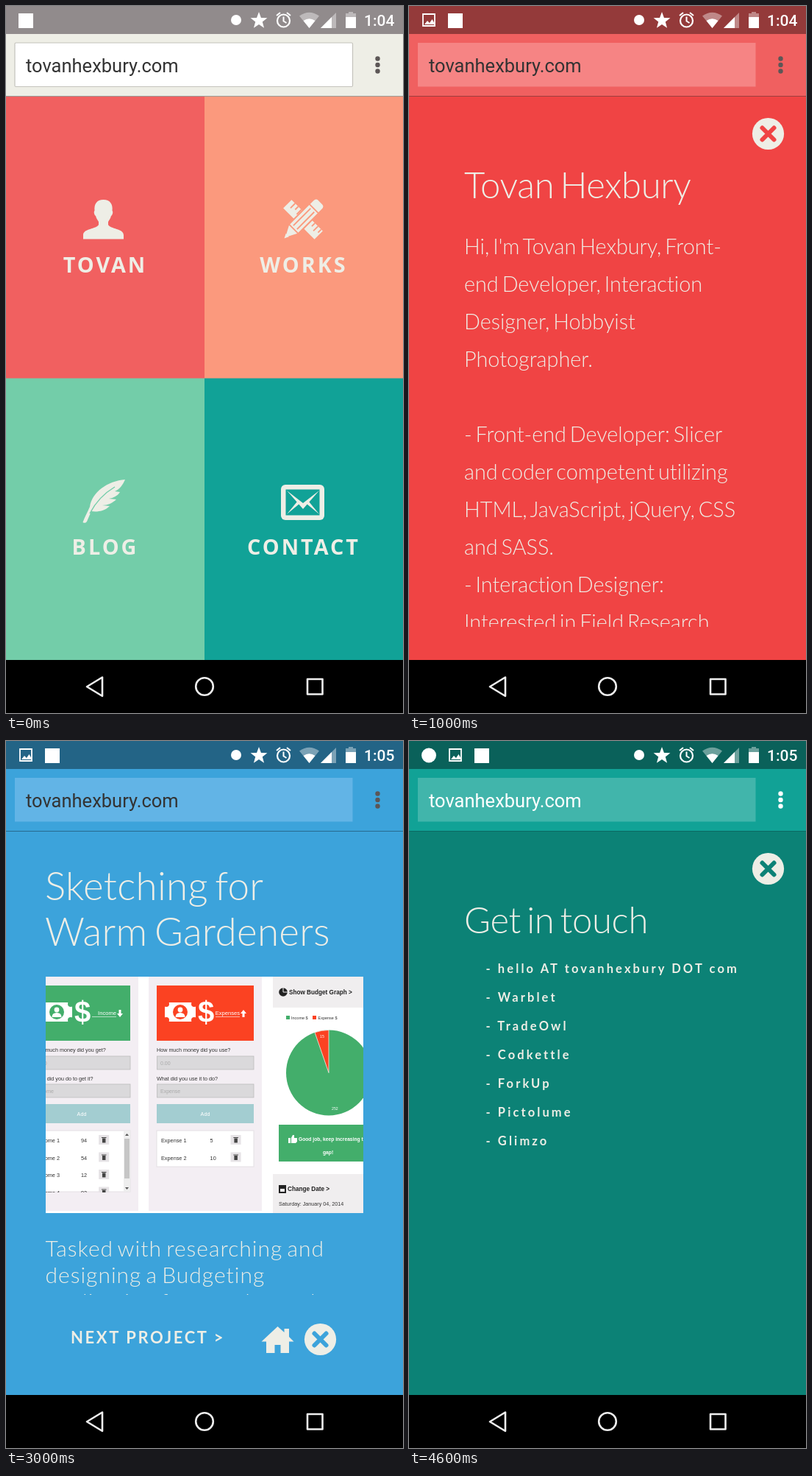
Recreate the animation shown at these times as an HTML page. Size 540 px wide and 960 px high, loop 5 s.

```html
<!DOCTYPE html>
<html lang="en">
<head>
<meta charset="utf-8">
<title>Mobile site tour</title>
<style>
  html, body { margin: 0; width: 100%; height: 100%; overflow: hidden; background: #000; }
  svg { display: block; width: 100vw; height: 100vh; }
  text { white-space: pre; }
  .roboto { font-family: Roboto, sans-serif; }
  .lato { font-family: Lato, sans-serif; fill: #eeeee6; font-variant-ligatures: none; }
  .light { font-weight: 300; word-spacing: -0.1em; }
  .bold { font-weight: 700; }
  .label { font: 700 28.8px "Open Sans", sans-serif; letter-spacing: 3px; fill: #eeeee6; text-anchor: middle; }
  .arial { font-family: "Liberation Sans", Arial, sans-serif; }
</style>
</head>
<body>
<svg id="stage" viewBox="0 0 540 960" xmlns="http://www.w3.org/2000/svg"></svg>
<script>
const CREAM = '#eeeee6', GREEN = '#43ae6b', RED = '#fb4222';
const SITE = 'tovanhexbury.com';
const SCENE_MS = 1000;

const rect = (x, y, w, h, fill, extra = '') =>
  `<rect x="${x}" y="${y}" width="${w}" height="${h}" fill="${fill}" ${extra}/>`;
const circle = (x, y, r, fill, extra = '') =>
  `<circle cx="${x}" cy="${y}" r="${r}" fill="${fill}" ${extra}/>`;
const path = (d, fill, extra = '') => `<path d="${d}" fill="${fill}" ${extra}/>`;
const line = (d, color, width, extra = '') =>
  path(d, 'none', `stroke="${color}" stroke-width="${width}" ${extra}`);
const group = (content, attrs) => `<g ${attrs}>${content}</g>`;
const text = (x, y, str, size, cls, extra = '') =>
  `<text x="${x}" y="${y}" font-size="${size}" class="${cls}" ${extra}>${str.replace(/>/g, '&gt;')}</text>`;
const lato = (x, y, str, size, spacing = 0, weight = 'bold', extra = '') =>
  text(x, y, str, size, 'lato ' + weight, `letter-spacing="${spacing}" ${extra}`);
const arial = (x, y, str, size, fill = '#333', extra = '') =>
  text(x, y, str, size, 'arial', `fill="${fill}" ${extra}`);
const title = str => lato(75, 261, str, 49, -0.3, 'light');

// Browser and system bars
const notices = {
  app: x => rect(x - 10, 10, 20, 20, '#fff'),
  cloud: x => circle(x, 19.5, 10, '#fff'),
  photo: x => line(`M${x - 8} 11h16v16h-16z`, '#fff', 1.8) +
    path(`M${x - 6} 25l4-5 3 3 3.5-5 4 7z`, '#fff')
};

function starPath(cx, cy, r) {
  const points = Array.from({ length: 10 }, (_, i) => {
    const a = i * Math.PI / 5 - Math.PI / 2, d = i % 2 ? r * 0.42 : r;
    return `${cx + d * Math.cos(a)} ${cy + d * Math.sin(a)}`;
  });
  return `M${points.join('L')}z`;
}

function statusIcons(clock) {
  return circle(313, 19, 7, '#fff') +
    path(starPath(344, 20, 12), '#fff') +
    circle(377.5, 20, 8.5, 'none', 'stroke="#fff" stroke-width="2.2"') +
    line('M377.5 14.5v6l4 2.5M368 13l5-4M387 13l-5-4', '#fff', 2) +
    path('M399 13.5Q412.5 4 426 13.5L412.5 30z', '#fff', 'opacity=".4"') +
    path('M404.5 20Q412.5 14.5 420.5 20L412.5 30z', '#fff') +
    path('M449 9v21h-21z', '#fff', 'opacity=".4"') +
    path('M443 15v15h-15z', '#fff') +
    path('M462 10h4v-2h6v2h4v6h-14z', '#fff', 'opacity=".4"') +
    rect(462, 15, 14, 15, '#fff') +
    text(487, 27, clock, 21, 'roboto', 'font-weight="500" fill="#fff"');
}

function topBars({ status, bar, box, icons, clock, ink = '#333', dots = '#5c5656', border = '' }) {
  return rect(0, 0, 540, 38, status) +
    rect(0, 38, 540, 85, bar) +
    rect(0, 122, 540, 1, '#000', 'opacity=".35"') +
    rect(12, 50, 459.5, 59.5, box, border) +
    text(27, 90, SITE, 25.5, 'roboto', `fill="${ink}"`) +
    [71.5, 80, 88.5].map(y => circle(505.5, y, 3.2, dots)).join('') +
    icons.map((name, i) => notices[name](27 + 36 * i)).join('') +
    statusIcons(clock);
}

const navBar = rect(0, 888, 540, 72, '#000') +
  line('M131 911.5v25.500l-21-12.750z', '#eee', 2.6, 'stroke-linejoin="round"') +
  circle(270, 924, 11.8, 'none', 'stroke="#eee" stroke-width="2.6"') +
  line('M410 914h20.5v20.5h-20.5z', '#eee', 2.6, 'stroke-linejoin="round"');

const closeButton = (x, y, color) => circle(x, y, 21.6, CREAM) +
  line(`M${x - 8} ${y - 8}l16 16m0-16l-16 16`, color, 6, 'stroke-linecap="round"');

// Home tiles
const person = path('M132.5 263c-9 0-13 6-12 15c-1.5 1-.5 6 1.5 7c1 4 3 6 4 8v4' +
  'c-3 6-21 5-21 14v5.5h55v-5.5c0-9-18-8-21-14v-4c1-2 3-4 4-8c2-1 3-6 1.5-7c1-9-3-15-12-15z', CREAM);

const tools = group(
  group(rect(-8, -30, 16, 60, CREAM) +
    [-24, -18, -12, 14, 20, 26].map((y, i) => rect(i % 2 ? 2 : -1, y, i % 2 ? 6 : 9, 1.8, '#fb997d')).join(''),
    'transform="rotate(-45)"') +
  group(path('M-9-28q0-6 5-6h8q5 0 5 6v47l-9 17-9-17z', CREAM, 'stroke="#fb997d" stroke-width="2"') +
    line('M-9-21h18M-9 18h18M-3.5-18v33M3.5-18v33', '#fb997d', 1.8) +
    path('M-3 30h6l-3 6z', CREAM),
    'transform="rotate(45)"'),
  'transform="translate(404 290)"');

const feather = path('M162 643c-24 2-45 17-48 37c-3 7-7 14-9.5 21c2 1.5 4 1 5.5-1' +
  'l6-14c6 1 17 1 25-7l-10-1c7 0 14-3 19-8l-10-1c6-1 12-4 15-9l-7-1c7-3 11-9 14-16z', CREAM) +
  line('M114 689q12-23 34-36', '#73cda9', 1.4);

const mail = rect(374, 650, 59, 48, CREAM, 'rx="6"') + rect(380.5, 656.5, 46, 35, '#11a297') +
  path('M382 658l22 17 22-17-22 25z', CREAM) +
  path('M382 690l14-17 3 3zM426 690l-14-17-3 3z', CREAM);

const tile = (x, y, color, icon, name) => rect(x, y, 270, 383, color) + icon +
  `<text x="${x + 135}" y="${y + 239}" class="label">${name}</text>`;

const home = tile(0, 123, '#f16060', person, 'TOVAN') +
  tile(270, 123, '#fb997d', tools, 'WORKS') +
  tile(0, 505.5, '#73cda9', feather, 'BLOG') +
  tile(270, 505.5, '#11a297', mail, 'CONTACT');

// About
const bio = [
  "Hi, I'm Tovan Hexbury, Front-", 'end Developer, Interaction', 'Designer, Hobbyist', 'Photographer.', '',
  '- Front-end Developer: Slicer', 'and coder competent utilizing', 'HTML, JavaScript, jQuery, CSS',
  'and SASS.', '- Interaction Designer:', 'Interested in Field Research'
];
const about = rect(0, 123, 540, 765, '#f04444') + closeButton(488.5, 173.5, '#f04444') +
  title('Tovan Hexbury') +
  group(bio.map((str, i) => lato(75, 337 + 51 * i, str, 28.8, 0, 'light')).join(''), 'clip-path="url(#page)"');

// Budget application screenshot
function banknote(x, y, color) {
  const corners = [[2, 2], [40, 2], [2, 24], [40, 24]];
  return rect(x, y, 42, 26, '#fff') +
    corners.map(([dx, dy]) => circle(x + dx, y + dy, 4, color)).join('') +
    circle(x + 21, y + 13, 10, color) + circle(x + 21, y + 10, 3.4, '#fff') +
    path(`M${x + 14.5} ${y + 20}q0-6 6.5-6t6.5 6z`, '#fff');
}

function budgetRow(x, y, width, name, amount) {
  const bin = x + width * 0.815;
  return arial(x + 6, y, name, 7.3) + arial(x + width * 0.55, y, String(amount), 7.3) +
    rect(bin - 7, y - 10, 14, 13, '#e6e3e6') +
    rect(bin - 2.2, y - 5.5, 4.5, 6, '#444') + rect(bin - 3.2, y - 7, 6.5, 1, '#444');
}

function budgetColumn({ x, color, name, heading, verb, question, arrow, amounts, scroll }) {
  const rows = amounts.map((n, i) =>
    budgetRow(x, 545 + 23.5 * i, scroll ? 118 : 132, `${name} ${i + 1}`, n)).join('');
  const scrollBar = rect(x + 123, 529, 9, 83, '#eee') + rect(x + 124, 540, 7, 54, '#c6c6c6') +
    path(`M${x + 125} 536l2.5-3 2.5 3zM${x + 125} 606l2.5 3 2.5-3z`, '#555');
  const fields = [[428, '0.00'], [466, name]].map(([y, hint]) =>
    rect(x + 0.5, y, 131.5, 18, '#dad9db', 'stroke="#bbb" stroke-width=".8"') + arial(x + 5, y + 12, hint, 7, '#aaa'));
  return rect(x - 11, 320, 154, 318, '#f3eef3') + rect(x, 332, 132, 75, color) +
    banknote(x + 11, 355, color) +
    arial(x + 56, 382, '$', 40, '#fff', 'font-weight="700"') +
    arial(x + 113, 372, heading, 7.6, '#fff', 'text-anchor="end"') +
    rect(x + 80, 374, 33, 0.6, '#fff') +
    path('M-4 0h2.5v-5h3v5h2.500l-4 5z', '#fff', `transform="translate(${x + 118} 370) scale(1 ${arrow})"`) +
    arial(x, 422, `How much money did you ${verb}?`, 7.2) + arial(x, 461, question, 7.2) + fields.join('') +
    rect(x, 493, 132, 26, '#a3cdd1') + arial(x + 66, 509, 'Add', 7.2, '#fff', 'text-anchor="middle"') +
    group(rect(x, 529, 132, scroll ? 83 : 49, '#fff', 'stroke="#e4e0e4"') + rows + (scroll ? scrollBar : ''),
      `clip-path="url(#lists)"`);
}

const budget = rect(54, 320, 432, 321, '#fff') +
  budgetColumn({ x: 37, color: GREEN, name: 'Income', heading: 'Income', verb: 'get',
    question: 'What did you do to get it?', arrow: 1, amounts: [94, 54, 12, 92], scroll: true }) +
  budgetColumn({ x: 205, color: RED, name: 'Expense', heading: 'Expenses', verb: 'use',
    question: 'What did you use it to do?', arrow: -1, amounts: [5, 10] }) +
  rect(363, 320, 123, 42, '#f0eeef') + circle(377, 341, 5.8, '#222') + line('M377 335v6h6', '#f0eeef', 1) +
  arial(385, 344, 'Show Budget Graph >', 8.2, '#222', 'font-weight="700"') +
  rect(381, 373, 5, 5, GREEN) + arial(388, 377.5, 'Income $', 5.5) +
  rect(417, 373, 5, 5, RED) + arial(424.5, 377.5, 'Expense $', 5.5) +
  circle(439, 450.5, 58, GREEN) +
  path('M439 450.5v-58a58 58 0 0 0-19 3.2z', RED, 'stroke="#fff" stroke-width=".7"') +
  arial(427, 403, '15', 5.2, '#fff') + arial(443, 501, '252', 5.2, '#fff') +
  rect(371, 521, 115, 50, GREEN) +
  path('M384 539h3v7h-3zM388 539l2-4h2v4h4v5l-2 2h-6z', '#fff') +
  arial(398, 543, 'Good job, keep increasing the', 6.7, '#fff', 'font-weight="700"') +
  arial(431, 561, 'gap!', 6.7, '#fff', 'font-weight="700"') +
  rect(363, 588, 123, 53, '#f0eeef') + rect(371, 603, 10, 11, '#222') + rect(373, 608, 6, 4, '#f0eeef') +
  arial(383, 611, 'Change Date >', 8.2, '#222', 'font-weight="700"') +
  arial(371, 631, 'Saturday: January 04, 2014', 7.2);
const screenshot = group(budget, 'clip-path="url(#shot)"');

// Works
const scribble = (x, y, n, step = 7) =>
  line(`M${x} ${y}` + Array.from({ length: n }, (_, i) => `q${step / 2} ${i % 2 ? 5 : -6} ${step} -.6`).join(''), '#aaa', 1.5);

const sketch = rect(92, 672, 315, 171, '#d9d9d9') + group(
  scribble(112, 726, 12) + scribble(116, 744, 7) + scribble(118, 757, 6) + scribble(120, 770, 9) +
  scribble(247, 722, 4) + scribble(373, 703, 4) + scribble(369, 745, 4) +
  line('M110 731l88-9M113 799l86-8M113 799l5 44M121 812l48-5M125 828l42-4', '#b0b0b0', 1.6) +
  path('M240 746h16v-7h14v12h22v14h14v10h-42v-9h-24z', '#e4e4e4') +
  rect(204, 784, 203, 59, '#fff') + line('M204 784h203M204 794h6', '#bbb', 0.8) +
  arial(219, 791, 'Memovant', 7.5, '#555', 'font-weight="700"') + line('M217 793.5h72', '#aaa', 1) +
  arial(390, 791, 'Title', 6, '#444') +
  [[210, 'Available Categories'], [315, 'Selected Categories']].map(([x, str]) =>
    arial(x, 806, str, 5.8, '#666') + rect(x, 811, 87, 13, '#fff', 'stroke="#bbb" stroke-width=".8"') +
    arial(x + 3, 820, 'Search', 5, '#aaa') + rect(x, 830, 87, 14, '#f4f4f4', 'stroke="#bbb" stroke-width=".8"')).join('') +
  arial(212, 837, 'Social', 5, '#555') + arial(212, 843, 'Settings', 5, '#555') + arial(350, 838, 'Events', 5, '#555') +
  circle(305.5, 836, 5, '#eee', 'stroke="#bbb" stroke-width=".8"'),
  'filter="url(#soft)"');

const cardTitle = (y, str) => lato(105.5, y, str, 20, 3, 'bold', 'style="fill:#000;text-shadow:1px 1px 2px #fff,0 0 3px #fff"');

const works = rect(0, 123, 540, 765, '#fa8363') + closeButton(488.5, 173.5, '#fa8363') +
  title('My Works') + lato(81.5, 335, 'PORTFOLIO', 23, 3.3) +
  line('M253 310v16M248.5 322l4.5 5 4.5-5', CREAM, 1.9) +
  rect(80, 375, 339, 258, '#ea735a') +
  group(group(group(screenshot, 'filter="url(#blur)"'), 'transform="translate(92 387) scale(.729) translate(-54 -320)"') +
    rect(92, 387, 315, 234, '#fff', 'opacity=".12"'), 'clip-path="url(#card)"') +
  cardTitle(422, 'SKETCHING FOR') + cardTitle(446, 'WARM GARDENERS') +
  group(rect(80, 660, 339, 190, '#ea735a') + group(sketch, 'clip-path="url(#note)"') + cardTitle(707, 'MEMOVANT'),
    'clip-path="url(#page)"');

// Project
const house = path('M369.5 795l9 8v-5h6.5v11l6.5 6.5h-6.5v15.5h-11.5v-11h-8v11h-11.5v-15.5h-6.5z', CREAM);
const summary = ['Tasked with researching and', 'designing a Budgeting', 'application for people aged'];
const project = rect(0, 123, 540, 765, '#3ca3db') +
  lato(53, 216, 'Sketching for', 53, 0.3, 'light') + lato(53, 278, 'Warm Gardeners', 53, 0.3, 'light') +
  screenshot +
  group(summary.map((str, i) => lato(53.5, 700 + 36 * i, str, 30, 1, 'light')).join(''), 'clip-path="url(#summary)"') +
  lato(88, 818, 'NEXT PROJECT >', 22, 2.6) + house + closeButton(427.5, 812.5, '#3ca3db');

// Contact
const links = ['hello AT tovanhexbury DOT com', 'Warblet', 'TradeOwl', 'Codkettle', 'ForkUp', 'Pictolume', 'Glimzo'];
const contact = rect(0, 123, 540, 765, '#0c8276') + closeButton(488.5, 173.5, '#0c8276') +
  title('Get in touch') +
  links.map((str, i) => lato(104.5, 315 + 39 * i, '- ' + str, 16.5, 3.1)).join('');

const inner = ['photo', 'app'];
const scenes = [
  home + topBars({ status: '#918b8c', bar: '#eeeee6', box: '#fff', icons: ['app'], clock: '1:04',
    border: 'rx="1.5" stroke="#c4c3bc" stroke-width="1.2"' }),
  about + topBars({ status: '#943a3a', bar: '#f06060', box: '#f68484', icons: inner, clock: '1:04' }),
  works + topBars({ status: '#965c4b', bar: '#fb987d', box: '#ffab93', icons: inner, clock: '1:04' }),
  project + topBars({ status: '#236486', bar: '#3ca3db', box: '#62b4e6', icons: inner, clock: '1:05' }),
  contact + topBars({ status: '#0a615a', bar: '#11a296', box: '#41b5ab', icons: ['cloud', ...inner], clock: '1:05',
    ink: '#fff', dots: '#fff' })
];

const clip = (id, x, y, w, h) => `<clipPath id="${id}">${rect(x, y, w, h, '#000')}</clipPath>`;
const blur = (id, amount) => `<filter id="${id}"><feGaussianBlur stdDeviation="${amount}"/></filter>`;

const stage = document.getElementById('stage');
stage.innerHTML = '<defs>' + clip('page', 0, 123, 540, 720) + clip('shot', 54, 320, 432, 321) +
  clip('lists', 37, 528, 301, 85) + clip('card', 92, 387, 315, 234) + clip('note', 92, 672, 315, 171) +
  clip('summary', 0, 660, 540, 92) + blur('blur', 1.5) + blur('soft', 0.6) + '</defs>' +
  scenes.map(scene => group(scene, 'class="scene"')).join('') + navBar;

const layers = [...stage.querySelectorAll('.scene')];

function render(ms) {
  const current = Math.floor(ms / SCENE_MS) % layers.length;
  layers.forEach((layer, i) => layer.setAttribute('display', i === current ? 'inline' : 'none'));
}

const start = performance.now();
function tick() {
  render(performance.now() - start);
  requestAnimationFrame(tick);
}
tick();
</script>
</body>
</html>
```
